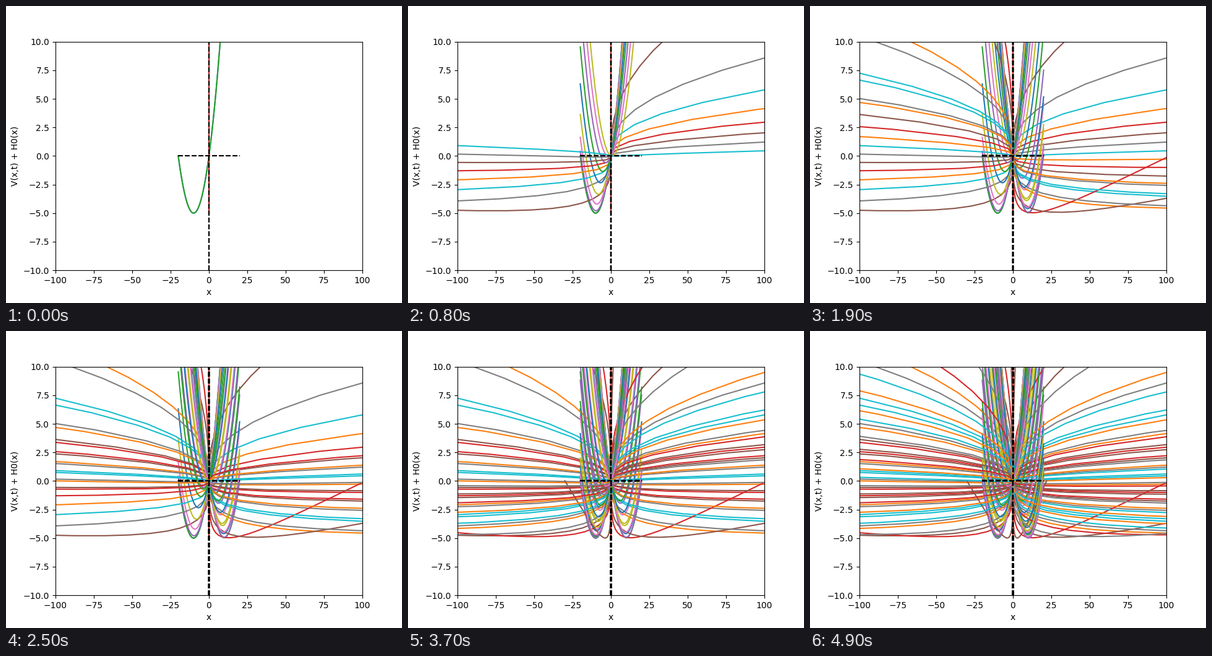
Recreate the animation shown at these times as a matplotlib script. Size 640 by 480 pixels, loop 5000 ms.

```python
import numpy as np
import matplotlib.pyplot as plt
from matplotlib.animation import FuncAnimation

FRAMES = 50
INTERVAL = 100

s = np.linspace(-20, 20, 50)
times = np.linspace(0, 10, FRAMES)

fig, ax = plt.subplots(figsize=(6.4, 4.8), dpi=100)
ax.set(xlim=(-100, 100), ylim=(-10, 10), xlabel="x", ylabel="V(x,t) + H0(x)")


def add_step(index, t):
    """Plot the potential, its parametric companion and the dashed axes."""
    energy = s**2 / 20 + s * np.cos(t)
    spread = 2 * np.sin(t)**2 * s**3
    first = 2 * index % 10
    return [
        *ax.plot(s, energy, color=f"C{first}"),
        *ax.plot(spread, energy, color=f"C{first + 1}"),
        *ax.plot(s, np.zeros_like(s), "k--"),
        *ax.plot([0, 0], [-10, 10], "k--"),
    ]


# The starting state is drawn twice, so the colour cycle begins one step late.
steps = [add_step(i, t) for i, t in enumerate([times[0], *times])]


def update(frame):
    for i, lines in enumerate(steps):
        for line in lines:
            line.set_visible(i <= frame + 1)
    return []


anim = FuncAnimation(fig, update, frames=FRAMES, interval=INTERVAL,
                     init_func=lambda: update(0), repeat=True, repeat_delay=0)
plt.show()
```
